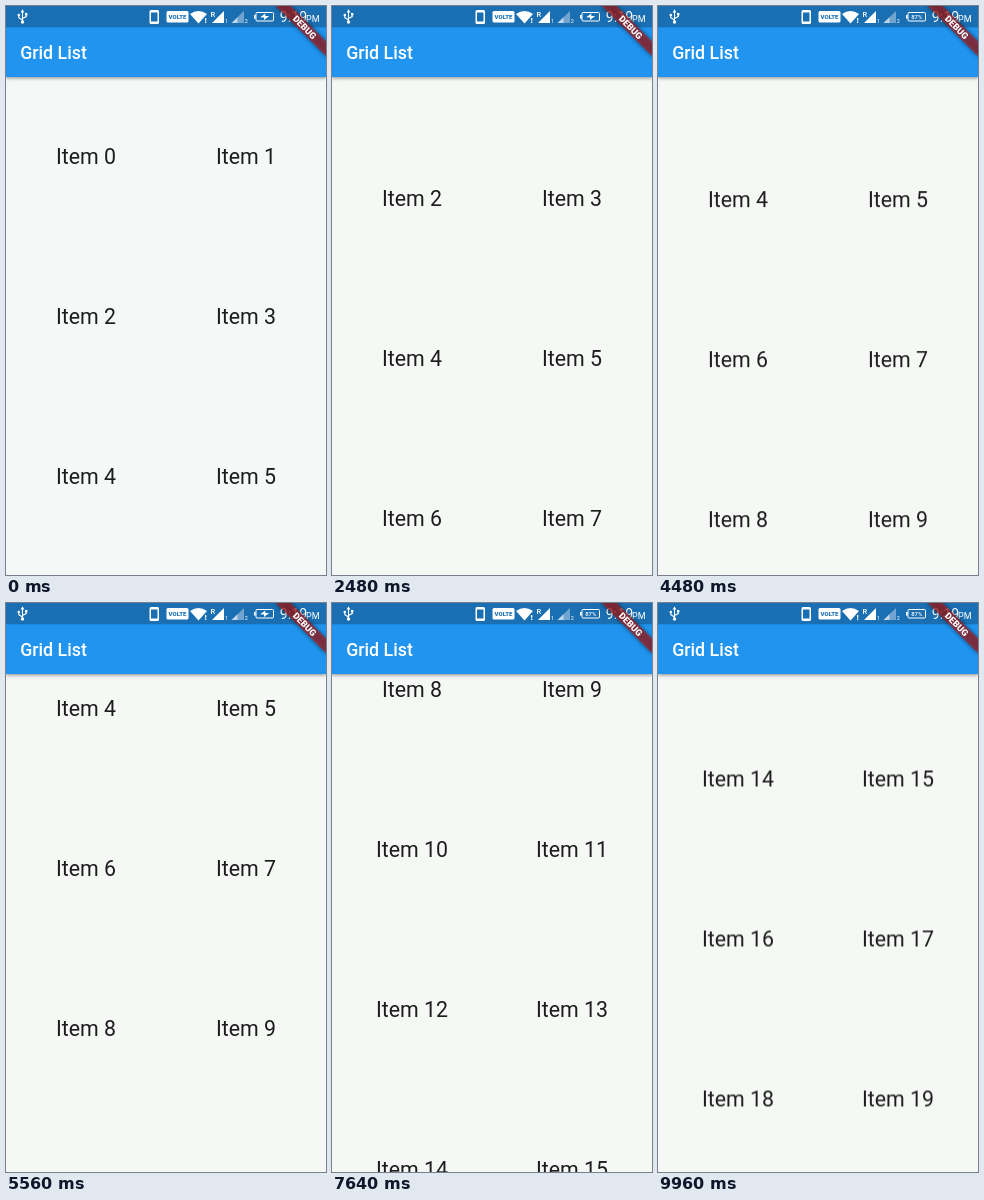
Recreate the animation shown at these times as an HTML page. Size 320 by 569 pixels, loop 10 s.

```html
<!DOCTYPE html>
<html lang="en">
<head>
<meta charset="utf-8">
<title>Grid List</title>
<style>
  html, body { margin: 0; width: 100%; height: 100%; overflow: hidden; }
  body { position: relative; font-family: Roboto, sans-serif; background: #f6f8f6; }
  #stage { position: absolute; left: 0; top: 0; width: 320px; height: 569px; overflow: hidden; }
  #list { position: absolute; left: 0; top: 71.1px; width: 320px; will-change: transform; }
  #list div {
    position: absolute; width: 160px; height: 160px; line-height: 160px;
    text-align: center; font-size: 21.33px; color: #1c1d1c; white-space: nowrap;
  }
  #bar {
    position: absolute; left: 0; top: 0; width: 320px; height: 71px; background: #2094ee;
    box-shadow: 0 1px 3px rgba(0, 0, 0, .32), 0 2px 4px rgba(0, 0, 0, .12);
  }
  #bar h1 {
    position: absolute; left: 14.2px; top: 22px; margin: 0;
    font-size: 17.78px; font-weight: 500; line-height: 50px; color: #fff; white-space: nowrap;
  }
  svg { position: absolute; left: 0; top: 0; }
</style>
</head>
<body>
<div id="stage">
  <div id="list"></div>
  <div id="bar"><h1>Grid List</h1></div>
  <svg width="320" height="72" viewBox="0 0 320 72" font-family="Roboto, sans-serif" fill="#fff">
    <defs>
      <filter id="soft" x="-20%" y="-80%" width="140%" height="260%"><feGaussianBlur stdDeviation="2"/></filter>
    </defs>
    <rect width="320" height="21.3" fill="#1a6fb3"/>

    <!-- usb -->
    <g stroke="#fff" stroke-width="1.1" fill="none">
      <path d="M16.5 6V16M16.5 14L12.8 11.8V9.5M16.5 12.6L20.2 10.6V8.6"/>
    </g>
    <path d="M16.5 3.2L18.4 6.4H14.6Z"/>
    <circle cx="16.5" cy="16" r="1.7"/>
    <circle cx="12.8" cy="9" r="1.3"/>
    <rect x="19" y="7" width="2.4" height="2.4"/>

    <!-- phone -->
    <path fill-rule="evenodd" d="M145 4H151.5Q153 4 153 5.5V16.5Q153 18 151.5 18H145Q143.500 18 143.500 16.500V5.500Q143.500 4 145 4ZM145 6.500V15.500H151.500V6.500Z"/>

    <!-- network badge -->
    <rect x="160.500" y="5" width="22" height="11.500" rx="1.500"/>
    <text x="171.500" y="13" font-size="6" font-weight="900" text-anchor="middle" fill="#1a6fb3">VOLTE</text>

    <!-- wifi -->
    <path d="M184 8Q192.500 2 201 8L192.500 17.500Z"/>
    <path d="M198 11h3.500v7h-3.500z" fill="#1a6fb3"/>
    <path d="M199 12h1.300v2.800h-1.300zM199 15.600h1.300v1.300h-1.300z"/>

    <!-- signal -->
    <path d="M218 5V17H206Z"/>
    <text x="204.500" y="10.500" font-size="7.500" font-weight="500">R</text>
    <text x="219" y="17" font-size="5.500">1</text>
    <path d="M238 5V17H225.500Z" opacity=".38"/>
    <path d="M231.500 11.300V17H225.500Z" opacity=".55"/>
    <text x="238.800" y="17" font-size="5.500">2</text>

    <!-- battery -->
    <rect x="250" y="6.500" width="17.500" height="8.500" rx="1" fill="none" stroke="#fff"/>
    <rect x="248" y="9" width="1.600" height="3.600"/>
    <path id="bolt" d="M254.200 11.200L259.300 7.500V10L263.200 9.900L258 14V11.600Z"/>
    <text id="level" x="258.800" y="13" font-size="6" font-weight="500" text-anchor="middle">87%</text>

    <text x="273.800" y="16" font-size="14.200">9:19</text>
    <text x="300" y="16" font-size="9">PM</text>

    <!-- debug ribbon -->
    <g transform="translate(320 0) rotate(45)">
      <rect x="-35.600" y="24.900" width="71.200" height="10.700" opacity=".5" fill="#000" filter="url(#soft)"/>
      <rect x="-35.600" y="24.900" width="71.200" height="10.700" fill="#b71c1c" fill-opacity=".63"/>
      <text y="33.400" font-size="9.070" font-weight="900" text-anchor="middle">DEBUG</text>
    </g>
  </svg>
</div>
<script>
  const LOOP = 10000, TICK = 40, ROW = 160;
  const $ = id => document.getElementById(id);
  const list = $('list'), bolt = $('bolt'), level = $('level');

  // [time, scroll offset]
  const path = [
    [0, 0], [1800, 0], [2160, 50], [2480, 118], [2800, 174], [3200, 222], [3680, 259],
    [3880, 270], [4560, 277], [5320, 277], [5560, 365], [5840, 492], [6160, 605],
    [6440, 662], [6880, 698], [7600, 698], [7640, 704], [8000, 800], [8480, 954],
    [8600, 1032], [8760, 1058], [9240, 1078], [9840, 1078], [9960, 1094.5], [10000, 1094.5]
  ];

  // intervals during which the charge level replaces the bolt
  const levelShown = [[880, 1840], [3880, 5360], [6880, 7880], [9880, LOOP]];

  for (let i = 0; i < 24; i++) {
    const cell = document.createElement('div');
    cell.textContent = 'Item ' + i;
    cell.style.left = (i % 2) * 160 + 'px';
    cell.style.top = (i >> 1) * ROW + 'px';
    list.append(cell);
  }

  const slope = i => (path[i + 1][1] - path[i][1]) / (path[i + 1][0] - path[i][0]);

  // harmonic mean keeps the curve monotone
  function tangent(i) {
    if (i === 0 || i === path.length - 1) return 0;
    const a = slope(i - 1), b = slope(i);
    return a * b > 0 ? 2 * a * b / (a + b) : 0;
  }

  function scrollAt(t) {
    let i = 0;
    while (i < path.length - 2 && t >= path[i + 1][0]) i++;
    const [t0, y0] = path[i], [t1, y1] = path[i + 1];
    const h = t1 - t0, u = (t - t0) / h, v = 1 - u;
    return y0 * (1 + 2 * u) * v * v + y1 * u * u * (3 - 2 * u)
      + h * u * v * (tangent(i) * v - tangent(i + 1) * u);
  }

  function draw(now) {
    const t = Math.floor((now % LOOP) / TICK) * TICK;
    list.style.transform = `translateY(${-scrollAt(t)}px)`;
    const showLevel = levelShown.some(([a, b]) => t >= a && t < b);
    level.style.display = showLevel ? '' : 'none';
    bolt.style.display = showLevel ? 'none' : '';
    document.body.style.background = t < 1840 ? '#f4f9f8' : '#f6f8f6';
  }

  const start = performance.now();
  function frame() {
    draw(performance.now() - start);
    requestAnimationFrame(frame);
  }
  frame();
</script>
</body>
</html>
```
